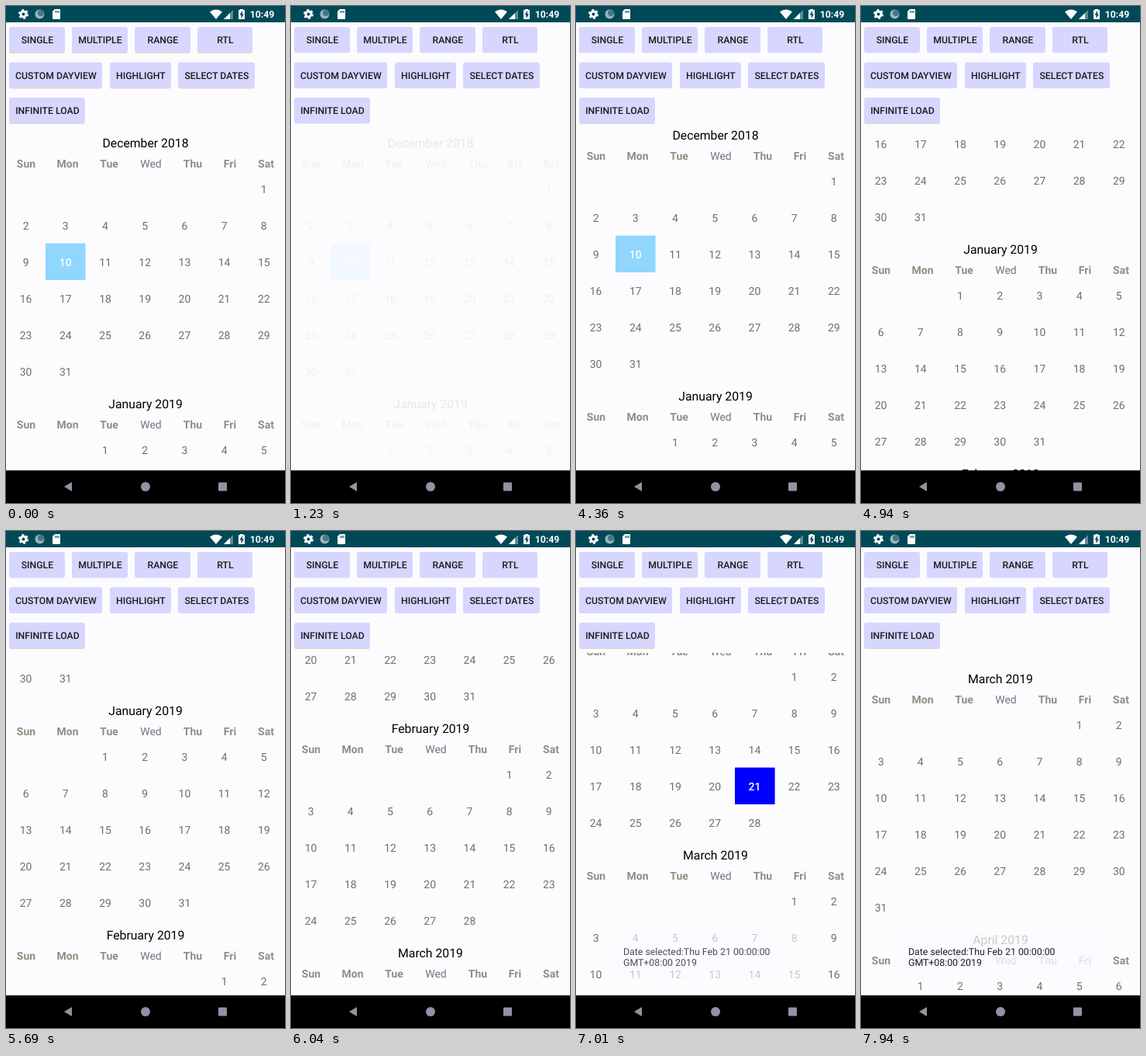
An HTML page that plays this animation: 360x640 px, repeating every 7.99 s.

```html
<!DOCTYPE html>
<html lang="en">
<head>
<meta charset="utf-8">
<title>Calendar list</title>
<style>
html, body { margin: 0; height: 100%; overflow: hidden; background: #fcfcff; }
svg { display: block; width: 360px; height: 640px; font-family: Roboto, sans-serif; }
text { text-anchor: middle; text-rendering: geometricPrecision; }
.label { font-size: 12.26px; font-weight: 500; fill: #1c1c1c; }
.clock { font-size: 12.26px; font-weight: 700; fill: #fff; }
.title { font-size: 15.77px; fill: #000; }
.head { font-size: 14px; font-weight: 700; fill: #8e8e84; }
.wed { font-weight: 400; fill: #74747c; }
.day { font-size: 14px; fill: #6f6f68; }
.on { fill: #fff; font-weight: 500; }
#toast text { font-size: 12.34px; fill: #202024; text-anchor: start; }
</style>
</head>
<body>
<svg viewBox="0 0 360 640">
  <defs>
    <clipPath id="listClip"><rect y="157" width="360" height="441"/></clipPath>
    <clipPath id="buttonClip"><rect x="5" y="119" width="97" height="33" rx="3"/></clipPath>
  </defs>
  <rect width="360" height="640" fill="#fcfcff"/>
  <rect y="594" width="360" height="4" fill="#fff"/>
  <g clip-path="url(#listClip)"><g id="list"></g></g>
  <g id="buttons"></g>
  <g id="press" clip-path="url(#buttonClip)">
    <rect x="4" y="118" width="98" height="34" fill="#dad7a8"/>
    <circle id="ripple" cx="55" cy="135" fill="#a6cca0"/>
  </g>
  <g id="labels"></g>
  <g id="toast">
    <rect x="47" y="519" width="266" height="59" rx="20" fill="#fcfcff" fill-opacity=".8"/>
    <text x="61" y="546">Date selected:Thu Feb 21 00:00:00</text>
    <text x="61" y="560">GMT+08:00 2019</text>
  </g>

  <rect width="360" height="21" fill="#004a57"/>
  <g fill="#fff">
    <circle cx="22.5" cy="10.5" r="3.5" fill="none" stroke="#fff" stroke-width="3"/>
    <circle cx="22.5" cy="10.5" r="5.5" fill="none" stroke="#fff" stroke-width="2" stroke-dasharray="2.88"/>
    <circle cx="43.5" cy="10.5" r="6" fill="#9cb4bc"/>
    <circle cx="45" cy="9" r="4" fill="#42788a"/>
    <path d="M63 4h6q1 0 1 1v11q0 1-1 1h-8q-1 0-1-1V7z"/>
    <path d="M64 6v3M66 6v3M68 6v3" stroke="#004a57"/>
    <path d="M263 7.5q8-6 16 0l-8 9.500z"/>
    <path d="M281 17L293 5V17z" fill="#5d8a93"/>
    <path d="M281 17L289 9V17z"/>
    <path d="M302 5V4h4v1h2v12h-8V5z"/>
    <path d="M305 6l-3.5 5.5h2V16l3.5-5.5h-2z" fill="#004a57"/>
  </g>
  <text class="clock" x="330.5" y="15">10:49</text>

  <rect y="598" width="360" height="42" fill="#000"/>
  <g fill="#9292a4">
    <path d="M75 619l10-6v12z"/>
    <circle cx="180" cy="619" r="6"/>
    <rect x="274" y="613.5" width="11" height="11" rx="1"/>
  </g>
</svg>
<script>
const LOOP = 7990, STEP = 45, ROW = 47, COL = 51.2;
const $ = id => document.getElementById(id);
const clamp = v => Math.max(0, Math.min(1, v));
const ramp = (t, a, b) => clamp((t - a) / (b - a));

function add(parent, tag, attrs, text) {
  const el = document.createElementNS('http://www.w3.org/2000/svg', tag);
  for (const k in attrs) el.setAttribute(k, attrs[k]);
  if (text !== undefined) el.textContent = text;
  parent.append(el);
  return el;
}

// Buttons: label, x, y, width
const shadows = [
  ['SINGLE', 4, 27, 72], ['MULTIPLE', 85, 27, 72], ['RANGE', 166, 27, 72], ['RTL', 247, 27, 71],
  ['CUSTOM DAYVIEW', 4, 72.5, 120], ['HIGHLIGHT', 134, 72.5, 79], ['SELECT DATES', 222, 72.5, 99],
  ['INFINITE LOAD', 4, 118, 98]
].map(([name, x, y, width]) => {
  add($('buttons'), 'rect', { x, y, width, height: 33.5, rx: 3, fill: '#d6d6ff' });
  add($('labels'), 'text', { class: 'label', x: x + width / 2 + .4, y: y + 21.3 }, name);
  return add($('buttons'), 'rect', { x: x + 1, y: y + 33, width: width - 2, height: 1, fill: '#e2deb0' });
});

// Months: name, weekday of the first, number of days, marked day, its colour
const headX = [26, 79.5, 133, 187, 241, 289, 335.5];
let top0 = 176, picked;
for (const [name, first, days, mark, fill] of [
  ['December 2018', 6, 31, 10, '#90d6ff'], ['January 2019', 2, 31],
  ['February 2019', 5, 28, 21, '#0000ff'], ['March 2019', 5, 31], ['April 2019', 1, 30]
]) {
  const list = $('list');
  add(list, 'text', { class: 'title', x: 180, y: top0 + 5.5 }, name);
  ['Sun', 'Mon', 'Tue', 'Wed', 'Thu', 'Fri', 'Sat'].forEach((d, i) =>
    add(list, 'text', { class: i === 3 ? 'head wed' : 'head', x: headX[i], y: top0 + 32 }, d));
  for (let d = 1; d <= days; d++) {
    const cell = first + d - 1, col = cell % 7, y = top0 + 60 + ROW * Math.floor(cell / 7);
    const x = COL * (col + .5);
    add(list, 'text', { class: 'day', x, y: y + 5 }, d);
    if (d === mark) {
      picked = add(list, 'g', {});
      add(picked, 'rect', { x: Math.round(COL * col), y: y - 24.4, width: 51.6, height: ROW + .4, fill });
      add(picked, 'text', { class: 'day on', x, y: y + 5 }, d);
    }
  }
  top0 += 54 + ROW * Math.ceil((first + days) / 7);
}

// Swipes: start, end, scroll from, scroll to
const swipes = [
  [4360, 4940, 10, 199], [5470, 6040, 199, 547],
  [6740, 7230, 547, 766], [7765, 7940, 766, 900]
];
function scrollAt(t) {
  let pos = 0;
  for (const [a, b, from, to] of swipes) {
    if (t < a) break;
    const p = t >= b ? 1 : Math.floor((t - a) / STEP) * STEP / (b - a);
    pos = from + (to - from) * p * p * (3 - 2 * p);
  }
  return Math.round(pos);
}

function draw(t) {
  const shown = t < 2520 ? 1 - ramp(t, 40, 1340) : ramp(t, 2640, 2920);
  $('list').setAttribute('opacity', shown);
  $('list').setAttribute('transform', `translate(0 ${-scrollAt(t)})`);
  picked.setAttribute('opacity', t >= 6900 ? 1 : 0);
  $('toast').setAttribute('opacity', ramp(t, 6860, 7050));

  shadows.forEach((s, i) => s.setAttribute('opacity', i === 7 || t < 2520 ? shown : 0));
  const tint = t < 2520 ? 0 : 1 - .6 * ramp(t, 2720, 2920) - .4 * ramp(t, 3060, 3150);
  $('press').setAttribute('opacity', tint);
  $('ripple').setAttribute('r', 22 + 40 * ramp(t, 2565, 2760));
  $('ripple').setAttribute('opacity', 1 - ramp(t, 2680, 2920));
}

function frame() {
  draw(performance.now() % LOOP);
  requestAnimationFrame(frame);
}
frame();
</script>
</body>
</html>
```
